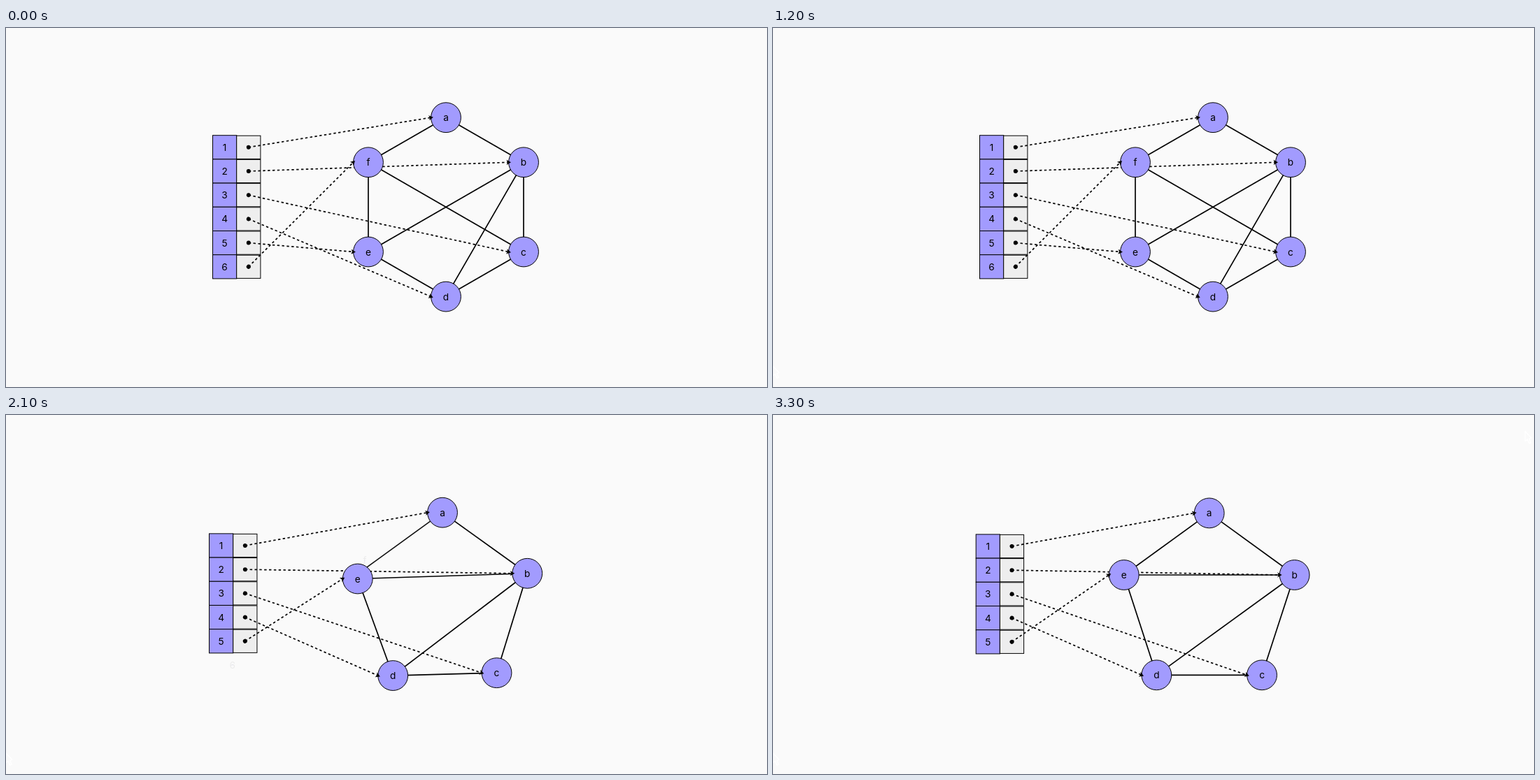
Animation, 1088 px wide and 514 px high, one loop 3.7 s. Source, as an HTML page with a canvas:

```html
<!DOCTYPE html>
<html lang="en">
<head>
<meta charset="utf-8">
<title>Removing a graph node</title>
<style>
  html, body { margin: 0; width: 100%; height: 100%; overflow: hidden; background: #fafafa; }
  canvas { display: block; }
</style>
</head>
<body>
<canvas id="stage" width="1088" height="514"></canvas>
<script>
const ctx = document.getElementById('stage').getContext('2d');
const LOOP = 3700, STEP = 100, REMOVE_AT = 1800;
const PURPLE = '#a29bfe', GREY = '#eeeeee', BACK = '#fafafa';
const CELL = 34.2, NODE_R = 21.4, RING_R = 128.2, LINE = 1.7;
const TABLE = { x: 295.5, y: 153.7 };
const SHIFT = { x: -5.3, y: 17.2 };   // whole scene re-centres after the removal
const NAMES = 'abcdef';
const KEPT_EDGES = ['ab', 'bc', 'cd', 'de', 'bd', 'be'];
const LOST_EDGES = ['fa', 'fe', 'fc'];

const ring = (count, x, y) => Array.from({ length: count }, (_, i) => {
  const angle = i * 2 * Math.PI / count;
  return { x: x + RING_R * Math.sin(angle), y: y - RING_R * Math.cos(angle) };
});
const hexagon = ring(6, 629, 256.4);
const pentagon = ring(5, 629, 251.4);

// Pointer trips: [time, x, y]
const TRIPS = [
  [[100, 1066, 35], [600, 350, 301.5], [800, 165, 406], [1100, -1, 483]],
  [[2300, 115, 461], [2900, 976, 78], [3200, 1074.5, 22.5]]
];

const mix = (p, q, k) => ({ x: p.x + (q.x - p.x) * k, y: p.y + (q.y - p.y) * k });

// Smooth polynomial through all points of a trip
function alongTrip(points, t) {
  const pos = { x: 0, y: 0 };
  for (const [ti, x, y] of points) {
    let weight = 1;
    for (const [tj] of points) if (tj !== ti) weight *= (t - tj) / (ti - tj);
    pos.x += x * weight;
    pos.y += y * weight;
  }
  return pos;
}

// Draws at (x, y) with size and opacity both set to `scale`
function scaled(x, y, scale, draw) {
  ctx.save();
  ctx.globalAlpha = scale;
  ctx.translate(x, y);
  ctx.scale(scale, scale);
  draw();
  ctx.restore();
}

function label(text, x, y, alpha) {
  ctx.globalAlpha = alpha;
  ctx.fillStyle = '#000';
  ctx.fillText(text, x, y + 5);
  ctx.globalAlpha = 1;
}

function box(x, y, w, h, fill) {
  ctx.fillStyle = fill;
  ctx.fillRect(x, y, w, h);
  ctx.lineWidth = 1;
  ctx.strokeRect(x, y, w, h);
}

function edge(p, q, scale = 1) {
  const mid = mix(p, q, 0.5);
  scaled(mid.x, mid.y, scale, () => {
    ctx.lineWidth = LINE;
    ctx.beginPath();
    ctx.moveTo(p.x - mid.x, p.y - mid.y);
    ctx.lineTo(q.x - mid.x, q.y - mid.y);
    ctx.stroke();
  });
}

function row(i, scale) {
  const x = TABLE.x + CELL, y = TABLE.y + CELL * (i + 0.5);
  scaled(x, y, scale, () => {
    box(-CELL, -CELL / 2, CELL, CELL, PURPLE);
    box(0, -CELL / 2 + 0.5, CELL, CELL - 1, GREY);
  });
  label(i + 1, x - CELL / 2 * scale, y, scale);
}

function node(name, { x, y }, scale) {
  scaled(x, y, scale, () => {
    ctx.beginPath();
    ctx.arc(0, 0, NODE_R, 0, 2 * Math.PI);
    ctx.fillStyle = PURPLE;
    ctx.fill();
    ctx.lineWidth = 1;
    ctx.stroke();
  });
  label(name, x, y, scale);
}

function reference(i, target, scale) {
  const from = { x: TABLE.x + CELL * 1.5, y: TABLE.y + CELL * (i + 0.5) };
  const to = { x: target.x - NODE_R, y: target.y };
  const mid = mix(from, to, 0.5);
  const length = Math.hypot(to.x - from.x, to.y - from.y);
  scaled(mid.x, mid.y, scale, () => {
    ctx.rotate(Math.atan2(to.y - from.y, to.x - from.x));
    ctx.translate(-length / 2, 0);
    ctx.lineWidth = LINE;
    ctx.setLineDash([3.42, 3.42]);
    ctx.beginPath();
    ctx.moveTo(0, 0);
    ctx.lineTo(length, 0);
    ctx.stroke();
    ctx.setLineDash([]);
    ctx.fillStyle = '#000';
    ctx.beginPath();
    ctx.arc(0, 0, 3, 0, 2 * Math.PI);
    ctx.fill();
    ctx.translate(length, 0);
    ctx.fill(new Path2D('M3.4 0L-3 -3.6L-1.6 0L-3 3.6Z'));
  });
}

const CURSOR = new Path2D('M.8 .8V15L4.2 12.4L6.6 18.2L9 17.2L6.6 11.6L9.6 10.6Z');
function cursor({ x, y }, fill, stroke) {
  ctx.save();
  ctx.translate(x, y);
  ctx.lineWidth = 1.5;
  ctx.lineJoin = 'round';
  ctx.fillStyle = fill;
  ctx.strokeStyle = stroke;
  ctx.fill(CURSOR);
  ctx.stroke(CURSOR);
  ctx.restore();
}

function scene(t) {
  const left = t < REMOVE_AT ? 1 : 0.645 * Math.exp(-0.0079 * (t - REMOVE_AT));
  const done = 1 - left;
  const nodes = hexagon.map((p, i) => i < 5 ? mix(p, pentagon[i], done) : p);
  const pick = (list, pair) => [...pair].map(c => list[NAMES.indexOf(c)]);
  const scaleOf = i => i < 5 ? 1 : left;

  ctx.save();
  ctx.translate(SHIFT.x * done, SHIFT.y * done);
  ctx.strokeStyle = '#000';
  for (let i = 0; i < 6; i++) row(i, scaleOf(i));
  for (const pair of KEPT_EDGES) edge(...pick(nodes, pair));
  for (const pair of LOST_EDGES) edge(...pick(hexagon, pair), left);
  if (done > 0) edge(...pick(pentagon, 'ae'), done);
  nodes.forEach((p, i) => {
    node(NAMES[i], p, scaleOf(i));
    reference(i, p, scaleOf(i));
  });
  ctx.restore();
}

function render(now) {
  const t = Math.floor(now % LOOP / STEP) * STEP;
  ctx.fillStyle = BACK;
  ctx.fillRect(0, 0, 1088, 514);
  ctx.font = '13.7px Inter, sans-serif';
  ctx.textAlign = 'center';
  scene(t);
  // The pointer leaves a pale trace where it exits
  for (const trip of TRIPS) {
    const start = trip[0][0], end = trip[trip.length - 1][0];
    if (t > end) cursor(alongTrip(trip, end), BACK, '#fff');
    else if (t >= start) cursor(alongTrip(trip, t), '#fff', '#000');
  }
}

const began = performance.now();
function tick() {
  render(performance.now() - began);
  requestAnimationFrame(tick);
}
tick();
</script>
</body>
</html>
```
